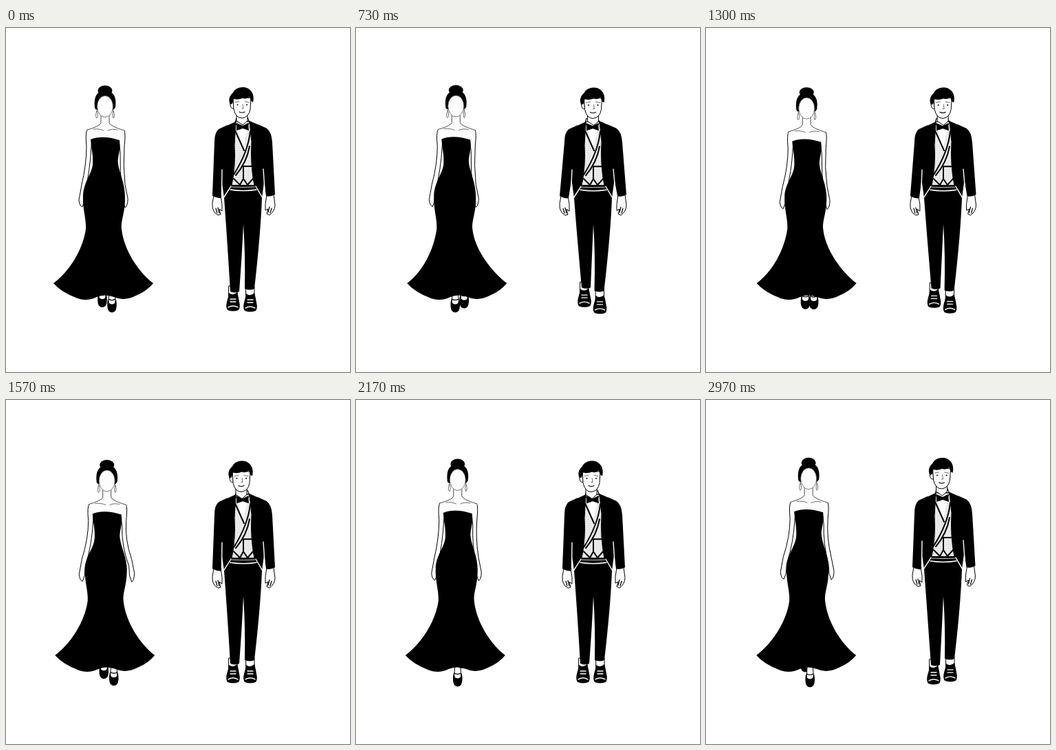
These frames come from a looping animation (500x500 px, 3000 ms). An HTML page:

```html
<!DOCTYPE html>
<html lang="en">
<head>
<meta charset="utf-8">
<title>Evening walk</title>
<style>
  html, body { margin: 0; width: 100%; height: 100%; overflow: hidden; background: #fff; }
  svg { display: block; width: 100vw; height: 100vh; }
  .skin { fill: #fdfdfd; stroke: #000; stroke-width: 1; stroke-linejoin: round; stroke-linecap: round; }
  .thin { fill: none; stroke: #333; stroke-width: .7; stroke-linecap: round; }
  .ink { fill: none; stroke: #000; stroke-width: 1.2; stroke-linecap: round; stroke-linejoin: round; }
  .chalk { fill: none; stroke: #fff; stroke-width: 1.4; stroke-linecap: round; }
</style>
</head>
<body>
<svg viewBox="0 0 500 500">
  <defs>
    <pattern id="tweed" width="3" height="3" patternUnits="userSpaceOnUse">
      <rect width="3" height="3" fill="#f0f0f0"/><circle cx="1" cy="1" r=".6" fill="#aaa"/>
    </pattern>
    <!-- feet are drawn with the toe tip at the origin -->
    <g id="heel">
      <path class="skin" d="M-4-32L-5-16Q-6-7 0-6Q6-7 5-16L4-32Z"/>
      <path d="M-6-20Q-8-8-5-3Q0 2 5-3Q8-8 6-20L4-14Q0-11-4-14Z"/>
      <path class="ink" d="M-5-20Q0-17 5-20"/>
    </g>
    <g id="shoe">
      <path class="skin" d="M-6-36L6-36L6-22L-6-22Z"/>
      <path d="M-6-26Q0-21 6-27Q8-20 9-13Q11-5 8-1Q0 2-8-1Q-11-5-9-13Q-7-19-6-26Z"/>
      <path class="chalk" stroke-width="1" d="M-4-17L4-17M-4-13L4-13M-7-5Q0-9 7-5"/>
    </g>
  </defs>

  <g id="woman">
    <use id="heelL" href="#heel"/>
    <use id="heelR" href="#heel"/>
    <path id="armL" class="skin"/>
    <path id="armR" class="skin"/>
    <g id="bust">
      <path class="skin" stroke="none" style="stroke:none" d="M138 124L138 138Q137 143 118 148L122 168L168 168L172 149Q152 143 150 138L150 124Z"/>
      <path class="thin" style="stroke:#000" d="M138 126L138 138Q136 143 118 148M150 126L150 138Q152 143 172 149"/>
      <path class="thin" d="M127 147Q136 146 142 149M148 149Q154 146 162 148"/>
      <ellipse cx="144" cy="91" rx="10.5" ry="7.5"/>
      <path d="M129 116Q126 92 144 91Q162 92 159 115Q157 119 155 119L133 119Q130 119 129 116Z"/>
      <ellipse cx="144" cy="114" rx="11.5" ry="15.5" fill="#fdfdfd" stroke="#444" stroke-width=".7"/>
      <path class="thin" stroke="#777" d="M132 120Q129 129 132 131Q135 128 132 120M156 120Q154 128 156 131Q159 128 156 120"/>
    </g>
    <path id="dress"/>
  </g>

  <g id="man">
    <use id="shoeL" href="#shoe"/>
    <use id="shoeR" href="#shoe"/>
    <path id="trousers"/>
    <g id="handL"><path class="skin" d="M302 244L300 255Q299 262 303 268L308 272L312 271L310 263L314 266L314 256L312 244Z"/>
      <path class="ink" d="M305 262L307 269M308 261L310 269"/></g>
    <g id="handR"><path class="skin" d="M379 242L377 256L377 265L381 263L379 270L383 272Q391 266 391 257L389 242Z"/>
      <path class="ink" d="M386 262L384 269M383 260L381 268"/></g>
    <g id="torso">
      <path d="M334 136L310 147L312 210L317 247L328 228L361 228L372 247L377 210L379 146L354 135Z"/>
      <path d="M334 136L354 136L357 165Q355 200 361 229L328 229Q334 200 332 170Z" fill="url(#tweed)" stroke="#000"/>
      <path d="M335 137L344 178L353 137Z" fill="#fff"/>
      <path class="ink" stroke-width="2" style="stroke-width:2" d="M333 149L346 178M355 150Q352 180 331 213M354 172Q350 195 334 214M345 201L357 201M345 202L345 220M331 219L340 228L345 219L351 228L359 219"/>
      <path d="M329 228L361 228L367 247L323 247Z"/>
      <path class="chalk" d="M327 230L316 247M363 230L373 247M326 235Q345 238 364 235"/>
      <path class="chalk" style="stroke-width:.8" d="M328 231Q345 232 362 231"/>
      <path d="M335 138L344 142L352 138L353 149L344 146L335 149Z"/>
      <path class="ink" d="M335 131L333 138L340 147M351 130L354 137L349 146"/>
    </g>
    <path id="sleeveL"/>
    <path id="sleeveR"/>
    <path id="gaps" class="chalk"/>
    <g id="head">
      <path class="skin" d="M335 124L335 135L344 141L351 135L351 124Z"/>
      <path class="skin" d="M330 107Q325 106 326 112Q327 118 331 117Z"/>
      <path class="skin" d="M330 101L331 118Q334 131 343 131Q353 130 355 118L356 102Z"/>
      <path d="M326 111C322 104 326 97 330 94C333 86 346 84 352 88C359 92 361 100 359 108L356 106L354 100Q349 104 344 102Q337 105 331 103L329 110Z"/>
      <path class="thin" d="M333 108L339 107M347 107L353 108M344 111L345 117L343 117"/>
      <path class="ink" d="M339 122Q343 124 347 122"/>
      <circle cx="336.500" cy="111.500" r="1"/><circle cx="350" cy="111.500" r="1"/>
    </g>
  </g>
</svg>
<script>
const LOOP = 3000, SHE = 500, HE = 600;
const el = id => document.getElementById(id);
const draw = (id, d) => el(id).setAttribute('d', d);
const move = (id, x, y = 0) => el(id).setAttribute('transform', `translate(${x} ${y})`);
const clamp = v => Math.max(0, Math.min(1, v));

// Cyclic interpolation: keys are [phase, ...values], the first at phase 0.
function cycle(keys, phase) {
  let i = keys.length - 1;
  while (keys[i][0] > phase) i--;
  const a = keys[i], b = keys[i + 1] || [1, ...keys[0].slice(1)];
  const k = (phase - a[0]) / (b[0] - a[0]);
  return a.slice(1).map((v, n) => v + (b[n + 1] - v) * k);
}

// bob, hem sway, left hand x, right hand x
const gown = [[0, 0, 0, 110, 174], [.14, 3.5, -.5, 107.5, 174], [.34, 2, -1, 110, 175.5],
  [.46, -.5, 4, 109, 174], [.64, 3.5, 2, 109, 175], [.84, 2, 0, 108, 177], [.94, .3, -1, 107, 178]];
// left x, left toe, right x, right toe
const heels = [[0, 140, 398, 147, 418], [.14, 139.5, 397, 147, 420], [.34, 144, 417, 149, 390],
  [.46, 143, 414, 156, 408], [.64, 142, 408, 154, 410], [.94, 139, 396, 146, 418]];
// head x, bob, left arm, right arm
const suit = [[0, 0, 0, 0, 0], [.217, 1.5, .5, -4, 2], [.283, 1.5, 0, -4, 2],
  [.617, -1, 2.5, 0, 0], [.783, 0, 4, -1.5, -1.5], [.95, -.5, -2, 0, .5]];
const shoes = [[0, 330, 411, 355, 412], [.217, 332, 405, 354.5, 415], [.283, 332, 413, 355, 410],
  [.617, 330, 411, 355, 411], [.783, 332, 419, 356, 405], [.95, 331, 413, 355, 409]];

function drawWoman(t) {
  const phase = t % SHE / SHE, u = t % 1500;
  const [bob, hem, left, right] = cycle(gown, phase);
  const [lx, ly, rx, ry] = cycle(heels, phase);
  const wide = clamp((190 - u) / 100);
  const reach = right + 7 * clamp(1 - Math.abs(u - 70) / 70);
  const Y = v => (v + bob).toFixed(2);
  const H = v => (v + hem).toFixed(2);

  move('woman', 5.2 * t / LOOP);
  move('bust', 0, bob);
  move('heelL', lx, ly + 8.5 * wide);
  move('heelR', rx + 7 * wide, ry - 4 * wide);
  draw('armL', `M118 ${Y(148)}Q115 ${Y(152)} 117 ${Y(172)}Q117 ${Y(198)} ${left} ${Y(228)}
    L${left - 4} ${Y(250)}Q${left - 3} ${Y(259)} ${left + 1} ${Y(260)}L${left + 4} ${Y(252)}L${left + 5} ${Y(238)}
    Q122 ${Y(208)} 124 ${Y(172)}L125 ${Y(160)}`);
  draw('armR', `M172 ${Y(149)}Q174 ${Y(153)} 172 ${Y(172)}Q170 ${Y(200)} ${reach - 1} ${Y(228)}
    L${reach + 3} ${Y(248)}Q${reach + 3} ${Y(258)} ${reach - 1} ${Y(261)}L${reach - 4} ${Y(252)}L${reach - 5} ${Y(238)}
    Q165 ${Y(208)} 166 ${Y(180)}L164 ${Y(162)}`);
  draw('dress', `M123 ${Y(162)}Q140 ${Y(155)} 165 ${Y(163)}C167 ${Y(180)} 161 ${Y(188)} 163 ${Y(198)}
    C165 ${Y(212)} 173 ${Y(225)} 173 247C173 270 167 278 168 292
    C171 322 ${H(192)} 354 ${H(214)} 371Q${H(205)} 382 ${H(191)} 388Q${H(172)} 398 ${H(157)} 391
    Q${H(143)} 386 ${H(132)} 391Q${H(118)} 398 ${H(104)} 393Q${H(80)} 384 ${H(69)} 371
    C${H(92)} 354 112 322 116 292C117 278 111 262 112 245
    C112 ${Y(225)} 125 ${Y(212)} 126 ${Y(198)}C127 ${Y(185)} 124 ${Y(175)} 123 ${Y(162)}Z`);
}

function drawMan(t) {
  const phase = t % HE / HE;
  const [hx, bob, la, ra] = cycle(suit, phase);
  const [lx, ly, rx, ry] = cycle(shoes, phase);
  const b = bob / 2, lc = ly - 28, rc = ry - 33;
  const Y = v => (v + b).toFixed(2);

  move('head', hx, bob);
  move('torso', 0, b);
  move('handL', la, b);
  move('handR', ra, b);
  move('shoeL', lx, ly);
  move('shoeR', rx, ry);
  draw('trousers', `M327 ${Y(229)}L317 ${Y(247)}Q321 300 ${lx - 4} ${lc}Q${lx + 3} ${lc + 3} ${lx + 9} ${lc}
    Q343 330 345 285Q348 330 ${rx - 8} ${rc}Q${rx} ${rc + 3} ${rx + 6} ${rc}Q370 300 372 ${Y(247)}L362 ${Y(229)}Z`);
  draw('sleeveL', `M322 ${Y(141)}L309 ${Y(147)}Q303 ${Y(152)} 303 ${Y(166)}L${300 + la} ${Y(244)}
    Q${307 + la} ${Y(248)} ${313 + la} ${Y(247)}L317 ${Y(195)}Z`);
  draw('sleeveR', `M366 ${Y(140)}L379 ${Y(146)}Q386 ${Y(151)} 387 ${Y(166)}L${391 + ra} ${Y(242)}
    Q${384 + ra} ${Y(246)} ${378 + ra} ${Y(244)}L371 ${Y(195)}Z`);
  draw('gaps', `M314 ${Y(206)}L${313.5 + la / 3} ${Y(243)}M374 ${Y(205)}L${376.5 + ra / 2} ${Y(242)}`);
}

function frame(now) {
  const t = now % LOOP;
  drawWoman(t);
  drawMan(t);
  requestAnimationFrame(() => frame(performance.now() - start));
}
const start = performance.now();
frame(0);
</script>
</body>
</html>
```
